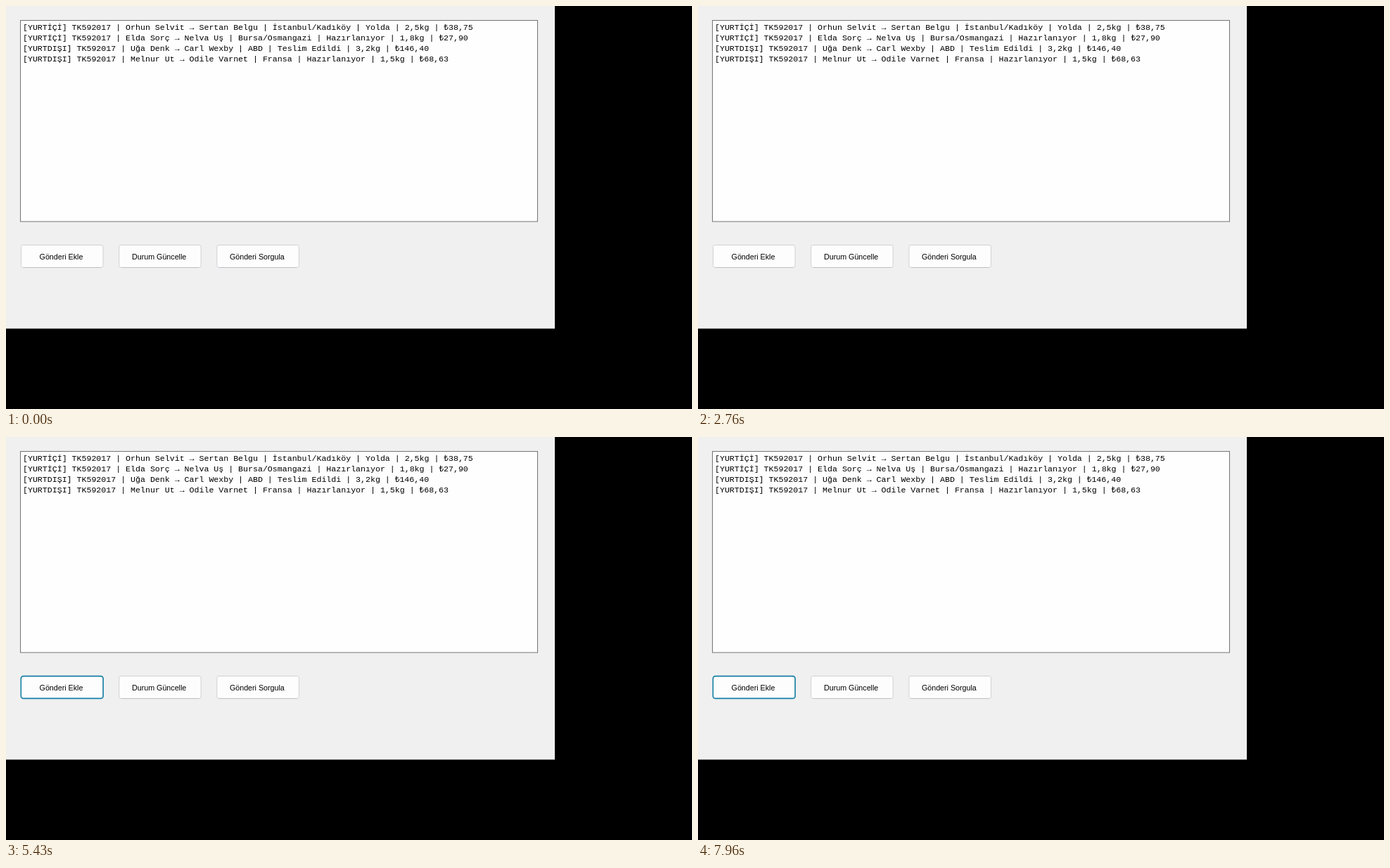
An HTML page that plays this animation: 975x574 px, repeating every 8 s.

```html
<!DOCTYPE html>
<html lang="tr">
<head>
<meta charset="utf-8">
<title>Gönderiler</title>
<style>
  html, body { margin: 0; width: 100%; height: 100%; overflow: hidden; background: #000; }
  svg { display: block; width: 975px; height: 574px; }
  .rows { font: 11.6px "Liberation Mono", "Courier New", monospace; white-space: pre; }
  .label { font: 10.7px "Liberation Sans", Arial, sans-serif; text-anchor: middle; }
  .button { fill: #fdfdfd; stroke: #d0d0d6; }
  .button-base { stroke: #bcbcc4; }
  #focus { fill: none; stroke: #147fa6; stroke-width: 1.6; opacity: 0; }
</style>
</head>
<body>
<svg viewBox="0 0 975 574">
  <rect width="780" height="459.5" fill="#f0f0f0"/>
  <rect x="20.5" y="20.5" width="735" height="286.5" fill="#fefefe" stroke="#747474"/>
  <g id="rows" class="rows"></g>
  <g id="buttons"></g>
  <rect id="focus" x="21.3" y="340.6" width="116.8" height="31.8" rx="3.5"/>
  <path id="cursor" d="M.5 .5V16.2L4.2 12.8 6.7 18.7 9.2 17.6 6.7 11.8H11.4Z"
        fill="#fff" stroke="#000" stroke-linejoin="round"/>
</svg>
<script>
const LOOP = 8000;
const NS = "http://www.w3.org/2000/svg";
const byId = id => document.getElementById(id);

function add(parent, tag, attrs, text = "") {
  const node = document.createElementNS(NS, tag);
  for (const [key, value] of Object.entries(attrs)) node.setAttribute(key, value);
  node.textContent = text;
  parent.append(node);
}

const shipments = [
  "[YURTİÇİ] TK592017 | Orhun Selvit → Sertan Belgu | İstanbul/Kadıköy | Yolda | 2,5kg | ₺38,75",
  "[YURTİÇİ] TK592017 | Elda Sorç → Nelva Uş | Bursa/Osmangazi | Hazırlanıyor | 1,8kg | ₺27,90",
  "[YURTDIŞI] TK592017 | Uğa Denk → Carl Wexby | ABD | Teslim Edildi | 3,2kg | ₺146,40",
  "[YURTDIŞI] TK592017 | Melnur Ut → Odile Varnet | Fransa | Hazırlanıyor | 1,5kg | ₺68,63"
];
shipments.forEach((line, i) => add(byId("rows"), "text", { x: 24, y: 34 + i * 15 }, line));

["Gönderi Ekle", "Durum Güncelle", "Gönderi Sorgula"].forEach((name, i) => {
  const x = 21.5 + i * 139.2;
  const group = byId("buttons");
  add(group, "rect", { class: "button", x, y: 340.5, width: 116.5, height: 32, rx: 3 });
  add(group, "path", { class: "button-base", d: `M${x + 3} 372.5h110.5` });
  add(group, "text", { class: "label", x: x + 57, y: 360.5 }, name);
});

// Time, x, y; "hold" keeps the place until the next step.
const path = [
  [0, -40, -40, "hold"],
  [480, 620, 260],
  [830, 853, 150],
  [1000, 896, 112],
  [1700, 896, 112],
  [1900, 536, 67],
  [2150, 1, 0],
  [2200, -40, -40, "hold"],
  [3600, 301, 102],
  [4060, 301, 102],
  [4450, 299, 128],
  [4860, 281, 385],
  [5000, 276, 580],
  [5500, 276, 580],
  [6000, 291, 181, "hold"],
  [6600, -40, -40, "hold"],
  [LOOP, -40, -40]
];
const timing = { duration: LOOP, iterations: Infinity };

byId("cursor").animate(path.map(([time, x, y, hold]) => ({
  offset: time / LOOP,
  transform: `translate(${x}px, ${y}px)`,
  easing: hold ? "steps(1, end)" : "linear"
})), timing);

byId("focus").animate([
  { offset: 0, opacity: 0, easing: "steps(1, end)" },
  { offset: 5400 / LOOP, opacity: 1 },
  { offset: 1, opacity: 1 }
], timing);
</script>
</body>
</html>
```
